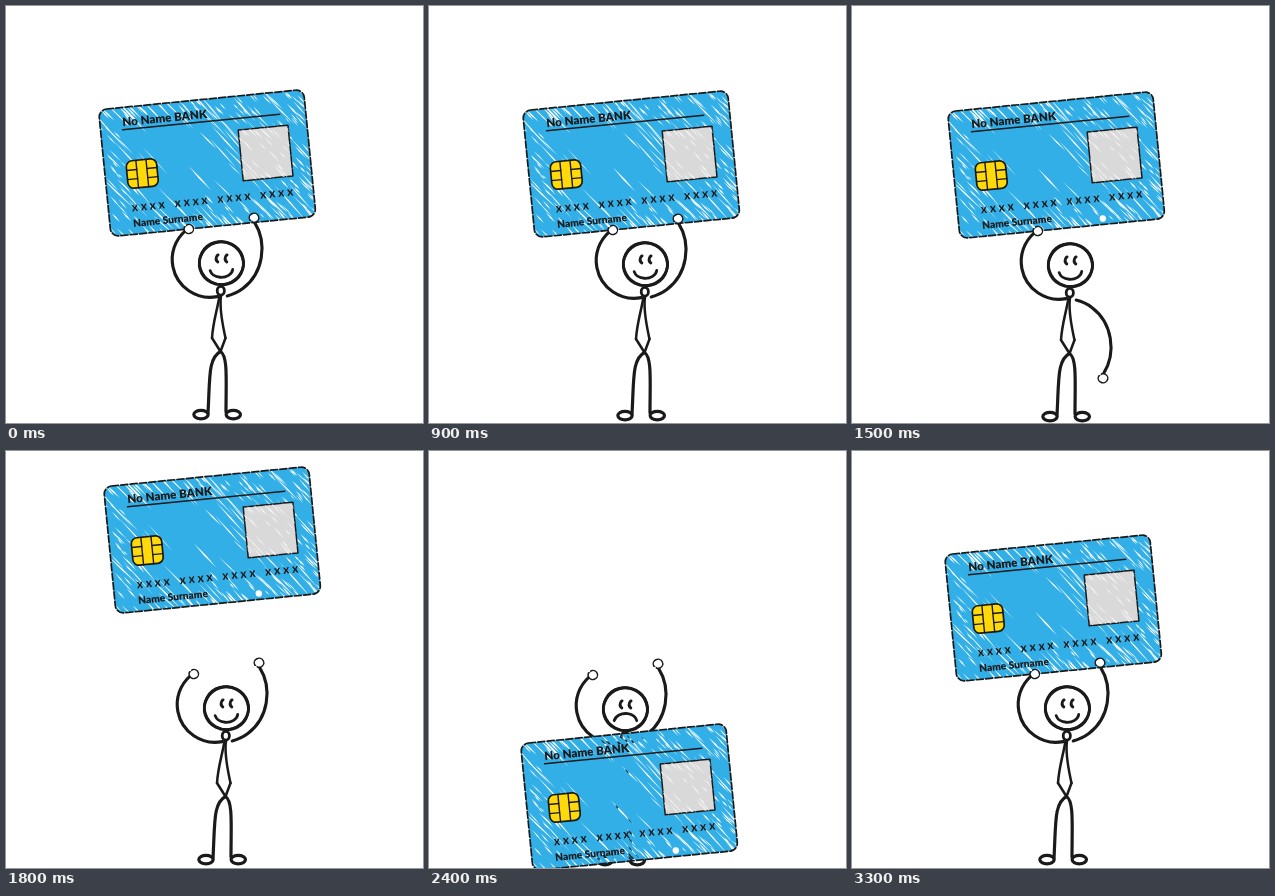
An HTML page with a canvas for the animation above (3700 ms loop, 417 px wide and 417 px high).

```html
<!DOCTYPE html>
<html lang="en">
<head>
<meta charset="utf-8">
<title>Card juggler</title>
<style>
html, body { margin: 0; width: 100%; height: 100%; overflow: hidden; background: #fff; }
canvas { display: block; }
</style>
</head>
<body>
<canvas id="stage" width="417" height="417"></canvas>
<script>
const SIZE = 417, LOOP = 3700, STEP = 300, LAST = 11;
const INK = '#1a1a1a', BLUE = '#33afe8', GREY = '#d9d9d9', YELLOW = '#ffd90a';
const CARD_W = 206, CARD_H = 127.5, TILT = -0.099;
const ctx = document.getElementById('stage').getContext('2d');

// The card is tossed for eight steps, lies on the floor for three, then is back in hand.
const sways = [0, 3, 5, 1, -20, 3, 5, 0];
const lifts = [0, 51, 14, -1, 36, -2, 68, 1];

function poseAt(step) {
  const fallen = step >= sways.length && step < LAST;
  const sway = sways[step] ?? 0, lift = lifts[step] ?? 0;
  return {
    fallen,
    card: fallen ? [step - 9, 189] : [sway, -lift],
    man: fallen ? [-19, 1] : [sway, Math.max(0, -lift)],
    sad: step === 7 || step === 8,
    armDown: step === 5
  };
}

function makeRandom(seed) {
  return () => (seed = (seed * 16807) % 2147483647) / 2147483647;
}

function line(c, x1, y1, x2, y2) {
  c.beginPath();
  c.moveTo(x1, y1);
  c.lineTo(x2, y2);
  c.stroke();
}

function oval(c, x, y, rx, ry, from = 0, to = Math.PI * 2, tilt = 0) {
  c.beginPath();
  c.ellipse(x, y, rx, ry, tilt, from, to);
  c.stroke();
}

function bend(c, x1, y1, cx1, cy1, cx2, cy2, x2, y2) {
  c.beginPath();
  c.moveTo(x1, y1);
  c.bezierCurveTo(cx1, cy1, cx2, cy2, x2, y2);
  c.stroke();
}

// Slim tapered strokes; a higher bias leaves the middle of the box emptier.
function scratches(c, count, length, bias, [x, y, w, h], seed) {
  const rnd = makeRandom(seed);
  for (let i = 0; i < count; i++) {
    const u = rnd(), v = rnd();
    const depth = 2 * Math.min(u, 1 - u, v, 1 - v);
    const len = length * (0.5 + rnd()), wide = 0.8 + 0.9 * rnd();
    const angle = 0.86 + 0.1 * rnd();
    if (rnd() < depth * bias) continue;
    c.save();
    c.translate(x + u * w, y + v * h);
    c.rotate(angle);
    c.beginPath();
    c.moveTo(-len / 2, 0);
    c.quadraticCurveTo(0, -wide, len / 2, 0);
    c.quadraticCurveTo(0, wide, -len / 2, 0);
    c.fill();
    c.restore();
  }
}

function write(c, text, x, y, px) {
  c.font = `900 ${px}px Lato, sans-serif`;
  c.fillStyle = INK;
  c.fillText(text, x, y);
}

function drawChip(c, x, y, w, h) {
  c.beginPath();
  c.roundRect(x, y, w, h, 6);
  c.fillStyle = YELLOW;
  c.fill();
  c.lineWidth = 1.7;
  c.stroke();
  c.lineWidth = 1.4;
  for (const part of [1 / 3, 2 / 3]) {
    line(c, x + w * part, y, x + w * part, y + h);
    line(c, x, y + h * part, x + w / 3, y + h * part);
    line(c, x + w * 2 / 3, y + h * part, x + w, y + h * part);
  }
}

function drawPhotoBox(c, x, y, w, h) {
  c.save();
  c.beginPath();
  c.rect(x, y, w, h);
  c.fillStyle = GREY;
  c.fill();
  c.lineWidth = 1.5;
  c.setLineDash([12, 1.5]);
  c.stroke();
  c.clip();
  c.fillStyle = 'rgba(255,255,255,.7)';
  scratches(c, 40, 14, 0.8, [x, y, w, h], 88);
  c.restore();
}

function makeCard() {
  const sheet = document.createElement('canvas');
  sheet.width = sheet.height = SIZE;
  const c = sheet.getContext('2d');
  const whole = [0, 0, CARD_W, CARD_H];
  c.translate(92.5, 103.8);
  c.rotate(TILT);
  c.lineCap = c.lineJoin = 'round';
  c.strokeStyle = INK;

  c.beginPath();
  c.roundRect(...whole, 8);
  c.fillStyle = BLUE;
  c.fill();

  // The scratches are gaps: whatever is behind the card shows through.
  c.globalCompositeOperation = 'destination-out';
  scratches(c, 420, 13, 2.2, whole, 4127);
  scratches(c, 80, 34, 0.5, whole, 951);
  c.beginPath();
  c.arc(144, 121.5, 3.2, 0, Math.PI * 2);
  c.fill();
  c.globalCompositeOperation = 'source-over';

  c.lineWidth = 1.7;
  c.setLineDash([7, 2.4]);
  c.beginPath();
  c.roundRect(...whole, 8);
  c.stroke();
  c.setLineDash([]);

  drawPhotoBox(c, 137, 34, 50, 51);
  drawChip(c, 22, 54, 30.5, 27.5);
  c.lineWidth = 1.6;
  line(c, 22, 22.3, 180, 22.3);

  write(c, 'No Name BANK', 22.5, 18.8, 11.6);
  write(c, 'Name Surname', 23.2, 120, 10.2);
  c.textAlign = 'center';
  for (let i = 0; i < 16; i++) {
    write(c, 'X', 26.5 + (i % 4) * 9 + Math.floor(i / 4) * 43, 104.5, 8.8);
  }
  return sheet;
}

function drawHand(c, x, y, start) {
  c.lineWidth = 3;
  c.fillStyle = '#fff';
  oval(c, x, y, 4, 3.8, start, start + 5.4);
  c.fill();
}

function drawFace(c, sad) {
  c.lineWidth = 2.8;
  for (const x of [213, 222]) oval(c, x, 252.5, 2.8, 3.8, 2, 4.4);
  if (sad) oval(c, 215.5, 270.5, 11.5, 9, Math.PI + 0.2, Math.PI * 2 - 0.2);
  else oval(c, 215.3, 262.5, 11.5, 8.8, 0.1, Math.PI - 0.25);
}

function drawRightArm(c, down) {
  c.save();
  if (down) {
    c.translate(0, 582);
    c.scale(1, -1);
  }
  c.lineWidth = 3.1;
  oval(c, 212, 243, 44, 48, -0.6, 1.36);
  drawHand(c, 248, 211.8, -3.6);
  c.restore();
}

function drawMan(c, { man, sad, armDown }) {
  c.save();
  c.translate(...man);
  c.lineCap = c.lineJoin = 'round';
  c.strokeStyle = INK;

  // Two slightly turned ovals give the head its uneven line.
  c.lineWidth = 2.8;
  for (const tilt of [-0.3, 0.5]) oval(c, 215.4, 257.2, 22.2, 21.3, 0, Math.PI * 2, tilt);
  drawFace(c, sad);

  c.lineWidth = 3.1;
  oval(c, 204, 253.5, 37.8, 37.8, 1.38, 4);
  drawHand(c, 182.8, 223, -1.9);
  drawRightArm(c, armDown);

  c.lineWidth = 2.8;
  oval(c, 214.8, 284.8, 3.6, 4.4);
  c.lineWidth = 2.5;
  bend(c, 213.5, 290, 211, 305, 207, 316, 206, 332);
  bend(c, 215, 290, 213, 304, 217, 320, 219.5, 332);
  line(c, 206, 332, 214.5, 345.5);
  line(c, 219.5, 332, 214.5, 345.5);

  c.lineWidth = 3.2;
  bend(c, 214.5, 345.5, 202, 352, 204, 372, 202, 407);
  bend(c, 214.5, 345.5, 222, 350, 220, 374, 220, 406);
  for (const x of [195, 227.3]) oval(c, x, 408.6, 7.2, 4.2);
  c.restore();
}

const card = makeCard();
const begin = performance.now();

function draw(now) {
  const time = Math.max(0, now - begin) % LOOP;
  const pose = poseAt(Math.min(LAST, Math.floor(time / STEP)));
  ctx.fillStyle = '#fff';
  ctx.fillRect(0, 0, SIZE, SIZE);
  if (pose.fallen) drawMan(ctx, pose);
  ctx.drawImage(card, ...pose.card);
  if (!pose.fallen) drawMan(ctx, pose);
  requestAnimationFrame(draw);
}
draw(begin);
</script>
</body>
</html>
```
